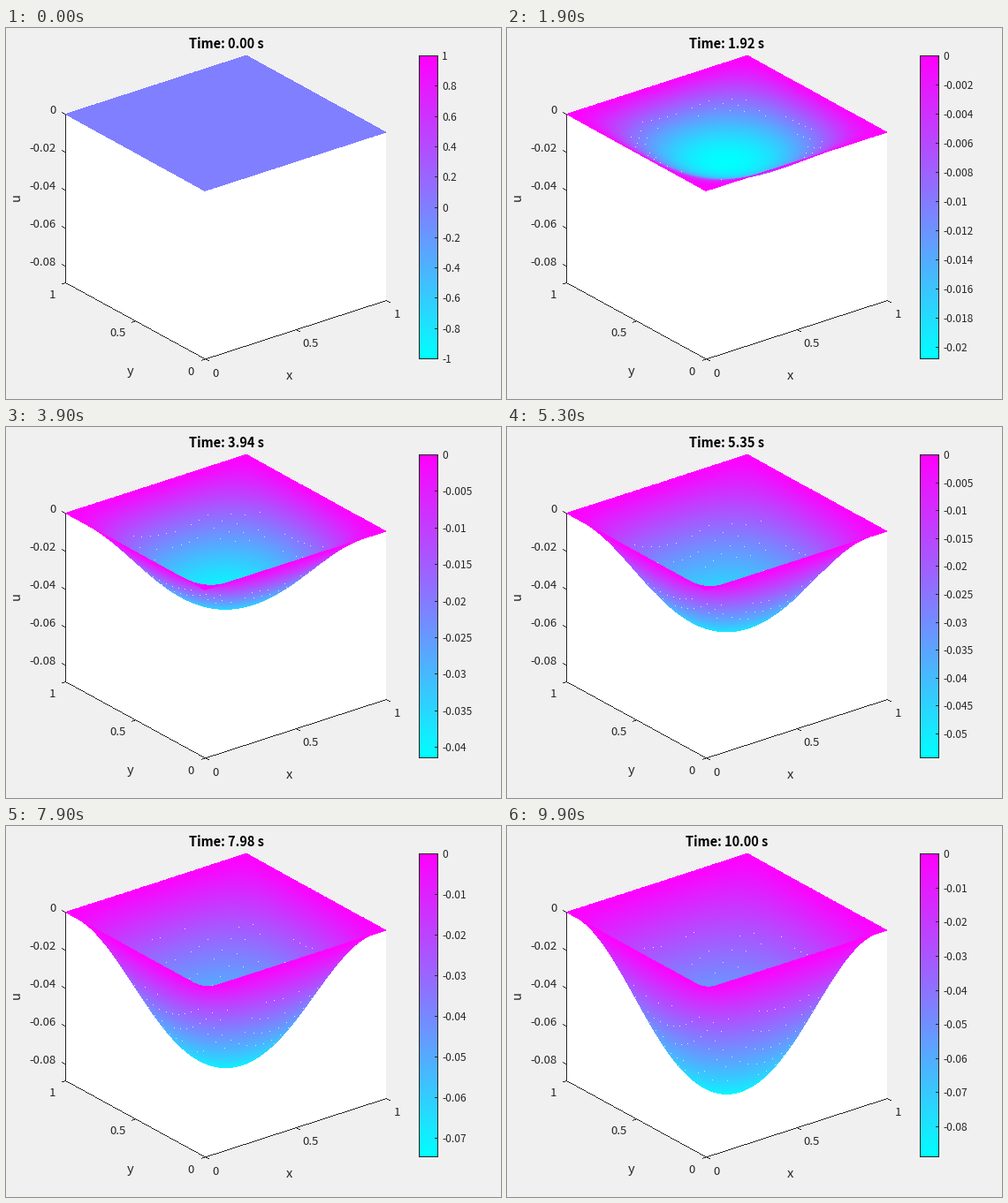
A matplotlib script for the animation above (10000 ms loop, 560x420 px).

```python
import numpy as np
import matplotlib.pyplot as plt
from matplotlib.animation import FuncAnimation

W, H, FRAMES = 560, 420, 100
DARK = "#262626"
PX = 0.72  # points per pixel at 100 dpi
ZMIN, ZSCALE = 0.0887, 191 / 0.0887

plt.rcParams["font.family"] = "Noto Sans CJK JP"
fig = plt.figure(figsize=(W / 100, H / 100), dpi=100, facecolor="#f0f0f0")
ax = fig.add_axes([0, 0, 1, 1])


def project(x, y, u=0.0):
    return 225 + 205 * x - 158 * y, 184.5 - 66.5 * x - 87 * y - ZSCALE * u


def label(x, y, s, size, ha="center", **kw):
    """Text whose digits are vertically centred on y."""
    return ax.text(x, y + 0.35 * size, s, fontsize=size * PX, ha=ha,
                   va="baseline", **{"color": DARK, **kw})


def stroke(img, p, q):
    """One-pixel hard line."""
    n = int(max(abs(p[0] - q[0]), abs(p[1] - q[1]))) + 1
    x = np.floor(np.linspace(p[0], q[0], n) + 0.5).astype(int)
    y = np.floor(np.linspace(p[1], q[1], n) + 0.5).astype(int)
    img[y, x] = (38, 38, 38, 255)


# Depth of the sag: mean rate of sinking over time
RATE = np.polyfit([1.11, 2.727, 3.94, 5.354, 7.98, 10],
                  [0.01082, 0.01077, 0.01052, 0.01009, 0.00938, 0.00887], 3)


def sag(t):
    return t * np.polyval(RATE, t)


def shape(x, y):
    p = 0.6 * 16 * x * (1 - x) * y * (1 - y)
    p += 0.4 * np.sin(np.pi * x) * np.sin(np.pi * y)
    return p + 0.2 * p * p * (1 - p)


# Surface samples, one column per pixel, ordered from back to front
SIDE = np.hypot(205, 158)
cols = np.arange(67, 430)
depth, colgrid = np.meshgrid(np.linspace(0.72, -0.72, 1500), cols, indexing="ij")
a = (colgrid + 0.5 - 248.5) / SIDE
sx = 0.5 + (205 * a + 158 * depth) / SIDE
sy = 0.5 + (205 * depth - 158 * a) / SIDE
inside = (sx >= 0) & (sx <= 1) & (sy >= 0) & (sy <= 1)
sx, sy, depth, col = sx[inside], sy[inside], depth[inside], colgrid[inside]
base = project(sx, sy)[1]
form = shape(sx, sy)

# Fine specks on mesh vertices
rng = np.random.default_rng(4)
mesh = np.arange(1, 22) / 22
gx, gy = [g.ravel() for g in np.meshgrid(mesh, mesh)]
keep = rng.random(gx.size) < 0.8
gx, gy = gx[keep], gy[keep]
gform = shape(gx, gy)
gdepth = (158 * (gx - 0.5) + 205 * (gy - 0.5)) / SIDE

ramp = np.arange(256) / 255
COOL = np.round(255 * np.stack([ramp, 1 - ramp, ramp * 0 + 1], 1)).astype(np.uint8)

# Static stage: box, axes and colour bar
stage = np.zeros((H, W, 4), np.uint8)
ax.fill([67, 272.5, 430, 430, 225, 67], [97, 31, 117.5, 308, 374.5, 288],
        color="white", lw=0, antialiased=False, zorder=0)
left, front, right = (67, 288), (225, 374.4), (430, 308)
for p, q in (((67, 97), left), (left, front), (front, right)):
    stroke(stage, p, q)
for i in range(5):
    y = 97 + 0.02 * i * ZSCALE
    stroke(stage, (67, y), (63, y - 2))
    label(57, y - 4.5, f"{-0.02 * i:.2f}" if i else "0", 13.2, "right")
for v, s in ((0, "0"), (0.5, "0.5"), (1, "1")):
    x, y = 225 + 205 * v, 374.4 - 66.4 * v
    stroke(stage, (x, y), (x + 4, y + 2))
    label(237.5 + 205 * v + 4 * (v == 0.5), 390 - 67 * v, s, 13.2)
    x, y = 225 - 158 * v, 374.4 - 86.4 * v
    stroke(stage, (x, y), (x - 4, y + 1.4))
    label(209.5 - 157 * v - 5 * (v == 0.5), 388 - 87 * v, s, 13.2)
label(320, 393, "x", 14.67)
label(141, 387.5, "y", 14.67)
ax.text(15.5, 191, "u", fontsize=14.67 * PX, color=DARK, rotation=90,
        rotation_mode="anchor", ha="center", va="baseline")
title = label(249, 17.5, "", 14.6, weight="bold", color="black")

X0, X1, Y0, Y1 = 467, 488, 31, 374
level = 255 - np.arange(Y1 - Y0 + 1) * 256 // (Y1 - Y0 + 1)
stage[Y0:Y1 + 1, X0:X1 + 1, :3] = COOL[level][:, None]
stage[Y0:Y1 + 1, X0:X1 + 1, 3] = 255
corners = [(X0, Y0), (X1, Y0), (X1, Y1), (X0, Y1)]
for p, q in zip(corners, corners[1:] + corners[:1]):
    stroke(stage, p, q)
names = [label(493, 0, "", 12, "left") for _ in range(13)]
power = [label(467, 21, "×10", 12, "left"), label(488, 16, "-3", 9.5, "left")]

picture = ax.imshow(stage, extent=(0, W, H, 0), aspect="auto",
                    interpolation="nearest", zorder=2)
ax.set_xlim(0, W)
ax.set_ylim(H, 0)
ax.axis("off")


def draw_surface(img, t, m):
    near = np.full((H, W), 9.0)
    row = np.floor(base + ZSCALE * m * form).astype(int)
    value = 1 - form if t else np.full(form.size, 0.5)
    img[row, col, :3] = COOL[np.minimum((value * 256).astype(int), 255)]
    img[row, col, 3] = 255
    near[row, col] = depth
    if t:
        on = (gform > 0.42 - 0.014 * t) & (gform < 0.52 + 0.033 * t)
        px, py = project(gx[on], gy[on], -m * gform[on])
        px, py = px.astype(int), py.astype(int)
        seen = abs(near[py, px] - gdepth[on]) < 0.02
        img[py[seen], px[seen], :3] = (225, 235, 225)


def nice_step(span):
    steps = (c * 10.0 ** e for e in range(-5, 1) for c in (1, 2, 5))
    return next(s for s in steps if span / s <= 11)


def draw_scale(img, hi, lo):
    span = hi - lo
    step = nice_step(span)
    count = int(span / step + 0.02) + 1
    small = span < 0.01
    for i, text in enumerate(names):
        text.set_visible(i < count)
        if i >= count:
            continue
        v = round(hi - i * step, 7)
        y = min(Y0 + (Y1 - Y0) * i * step / span, Y1)
        stroke(img, (X1 - 3, y), (X1, y))
        text.set_text(f"{v * (1000 if small else 1):.6g}" if v else "0")
        text.set_y(y + 5)
    for text in power:
        text.set_visible(small)


def update(k):
    t = 10 * k / (FRAMES - 1)
    m = sag(t)
    img = stage.copy()
    draw_surface(img, t, m)
    draw_scale(img, *((0, -m) if k else (1, -1)))
    picture.set_data(img)
    title.set_text(f"Time: {t:.2f} s")
    return []


anim = FuncAnimation(fig, update, frames=FRAMES, interval=100, repeat=True,
                     repeat_delay=0, blit=False)
plt.show()
```
